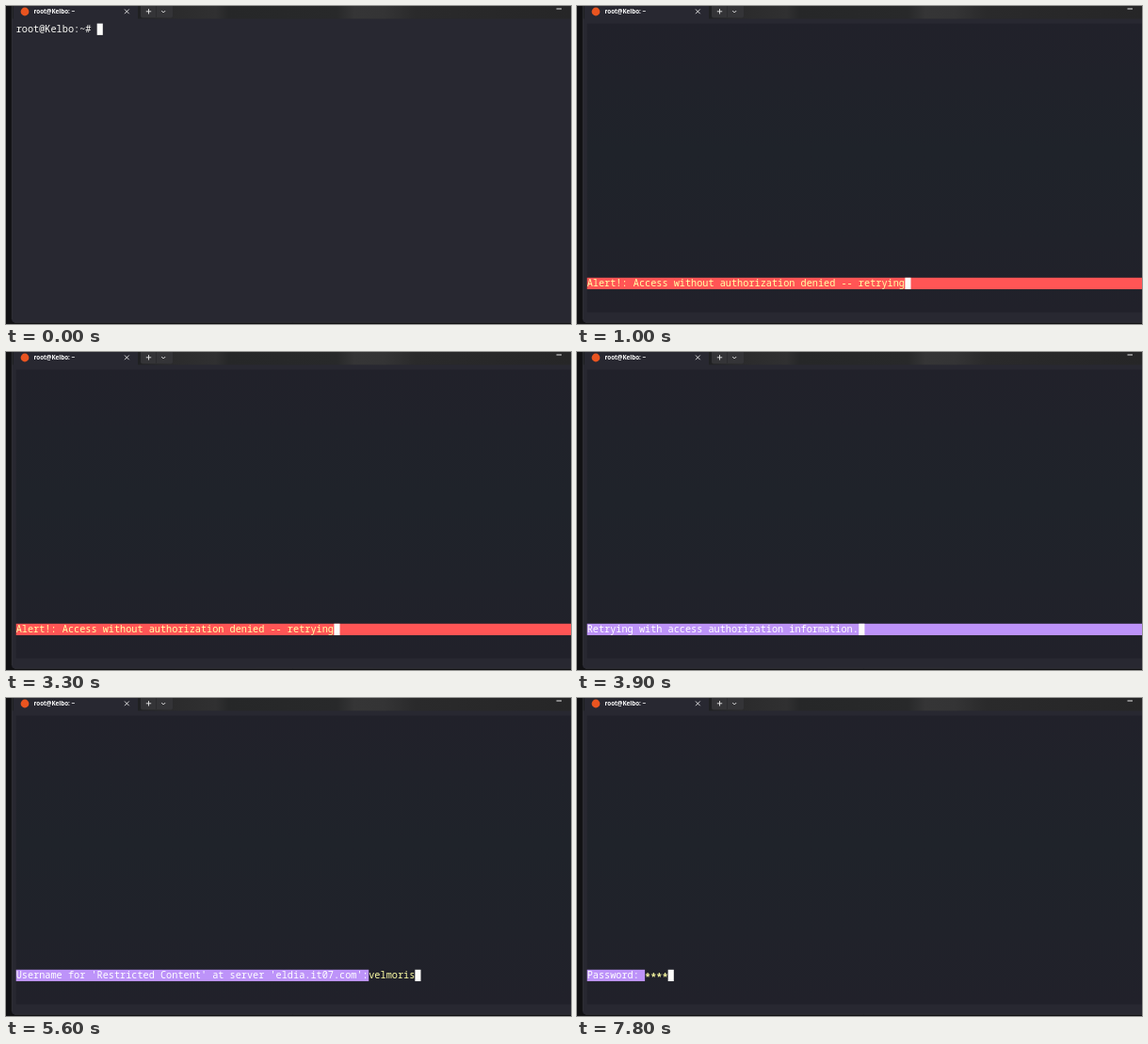
Write an HTML page with a canvas that moves like this. It is 600x338 px and loops after 8 s.

```html
<!DOCTYPE html>
<html lang="en">
<head>
<meta charset="utf-8">
<title>Terminal session</title>
<style>
  html, body { margin: 0; width: 100%; height: 100%; overflow: hidden; background: #111113; }
  canvas { display: block; width: 600px; height: 338px; }
</style>
</head>
<body>
<canvas id="stage" width="600" height="338"></canvas>
<script>
const ctx = document.getElementById('stage').getContext('2d');
const LOOP = 8000;
const CELL_W = 6.14, CELL_H = 12.28, LEFT = 10.7, TOP = 18.6, STATUS_ROW = 22;
const MONO = '500 10.23px "Noto Sans Mono", "DejaVu Sans Mono", monospace';
const COLORS = {
  body: '#282831', text: '#fafaf6', cursor: '#fcfcfa',
  red: '#ff5555', purple: '#bd93f9', yellow: '#ffffa5'
};

const PROMPT = 'root@Kelbo:~# ';
const COMMAND = 'lynx eldia.it07.com';
const ALERT = 'Alert!: Access without authorization denied -- retrying';
const RETRY = 'Retrying with access authorization information.';
const ASK_USER = "Username for 'Restricted Content' at server 'eldia.it07.com':";
const ASK_PASS = 'Password: ';
const USER = 'velmoriska';

// Times at which each further character appears.
const commandKeys = [[300, 4], [400, 15], [500, 19]];
const userKeys = [[4600, 1], [4700, 2], [4800, 3], [5000, 4], [5200, 5],
  [5300, 6], [5500, 7], [5600, 8], [5700, 9], [5800, 10]];
const passKeys = [[7300, 1], [7400, 2], [7500, 3], [7700, 4]];

function typedCount(keys, t) {
  let count = 0;
  for (const [at, n] of keys) if (t >= at) count = n;
  return count;
}

const within = (t, from, to) => t >= from && t < to;

const cursorHidden = t =>
  within(t, 1600, 2100) || within(t, 2600, 3200) ||
  within(t, 3700, 3800) || within(t, 6600, 7200);

function rect(color, x, y, w, h) {
  ctx.fillStyle = color;
  ctx.fillRect(x, y, w, h);
}

function gradient(x0, y0, x1, y1, stops) {
  const paint = ctx.createLinearGradient(x0, y0, x1, y1);
  stops.forEach(([at, color]) => paint.addColorStop(at, color));
  return paint;
}

function line(color, width, ...points) {
  ctx.strokeStyle = color;
  ctx.lineWidth = width;
  ctx.beginPath();
  points.forEach(([x, y], i) => i ? ctx.lineTo(x, y) : ctx.moveTo(x, y));
  ctx.stroke();
}

const colX = col => LEFT + col * CELL_W;
const rowY = row => TOP + row * CELL_H;

function write(text, col, row, color) {
  ctx.font = MONO;
  ctx.fillStyle = color;
  ctx.fillText(text, colX(col), rowY(row) + 9.4);
}

// Stars sit at mid-height of the lower-case letters.
function writeStars(count, col, row) {
  ctx.font = MONO.replace('500', '700');
  ctx.fillStyle = COLORS.yellow;
  ctx.fillText('*'.repeat(count), colX(col), rowY(row) + 11);
}

function cursor(col, row, t) {
  if (!cursorHidden(t)) rect(COLORS.cursor, colX(col), rowY(row), CELL_W, CELL_H);
}

function drawWindow() {
  rect('#111113', 0, 0, 600, 338);

  rect(gradient(140, 0, 600, 0, [
    [0, '#1f2022'], [0.08, '#2b2b2c'], [0.18, '#303031'], [0.21, '#262728'],
    [0.46, '#28292a'], [0.5, '#353536'], [0.57, '#343435'], [0.64, '#2a2a2b'],
    [1, '#262627']
  ]), 6, 0, 594, 14);

  ctx.fillStyle = COLORS.body;
  ctx.beginPath();
  ctx.roundRect(6, 13.5, 600, 323, [0, 0, 0, 4]);
  ctx.fill();
  rect(COLORS.body, 8, 0, 132, 14);
  line('#35353c', 0.7, [6.3, 0], [6.3, 333]);
  line('#35353c', 0.7, [9, 336.3], [600, 336.3]);

  ctx.fillStyle = '#343437';
  ctx.beginPath();
  ctx.roundRect(143, -3, 34, 15.5, 2);
  ctx.fill();
  line('#29292c', 0.7, [159.5, 0], [159.5, 12]);

  ctx.fillStyle = '#e95420';
  ctx.beginPath();
  ctx.arc(20, 6, 4.4, 0, Math.PI * 2);
  ctx.fill();

  ctx.font = '700 6.3px "Open Sans", "Noto Sans", sans-serif';
  ctx.fillStyle = '#fff';
  ctx.fillText('root@Kelbo: ~', 29.5, 8.4);

  const icon = '#e8e8e8';
  line(icon, 0.9, [126, 3.5], [130.7, 8.2]);
  line(icon, 0.9, [130.7, 3.5], [126, 8.2]);
  line(icon, 0.9, [148.8, 5.8], [154.2, 5.8]);
  line(icon, 0.9, [151.5, 3.1], [151.5, 8.5]);
  line(icon, 0.9, [165.2, 5], [167.2, 7], [169.2, 5]);
  line(icon, 1, [584.5, 3], [590, 3]);
}

function drawShell(t) {
  const command = COMMAND.slice(0, typedCount(commandKeys, t));
  write(PROMPT + command, 0, 0, COLORS.text);
  cursor(PROMPT.length + command.length, 0, t);
}

function drawStatus(t, message, fill, ink, width) {
  rect(fill, LEFT, rowY(STATUS_ROW), width, CELL_H);
  write(message, 0, STATUS_ROW, ink);
}

function drawBanner(t, message, fill, ink) {
  drawStatus(t, message, fill, ink, 600 - LEFT);
  cursor(message.length, STATUS_ROW, t);
}

function drawQuestion(t, message, answer, hidden) {
  const col = message.length;
  drawStatus(t, message, COLORS.purple, '#fff', col * CELL_W);
  if (hidden) writeStars(answer.length, col, STATUS_ROW);
  else write(answer, col, STATUS_ROW, COLORS.yellow);
  cursor(col + answer.length, STATUS_ROW, t);
}

function drawBrowser(t) {
  rect(gradient(0, 18, 0, 326, [
    [0, '#21212a'], [0.2, '#20222a'], [0.45, '#1f232a'], [0.75, '#20222a'], [1, '#21212a']
  ]), LEFT, TOP, 600 - LEFT, 25 * CELL_H);
  if (t < 1000) return;
  if (t < 3800) drawBanner(t, ALERT, COLORS.red, COLORS.yellow);
  else if (t < 4100) drawBanner(t, RETRY, COLORS.purple, '#fff');
  else if (t < 6000) drawQuestion(t, ASK_USER, USER.slice(0, typedCount(userKeys, t)), false);
  else drawQuestion(t, ASK_PASS, '*'.repeat(typedCount(passKeys, t)), true);
}

let start;
function frame(now) {
  start ??= now;
  const t = (now - start) % LOOP;
  drawWindow();
  if (t < 900) drawShell(t);
  else drawBrowser(t);
  requestAnimationFrame(frame);
}
requestAnimationFrame(frame);
</script>
</body>
</html>
```
